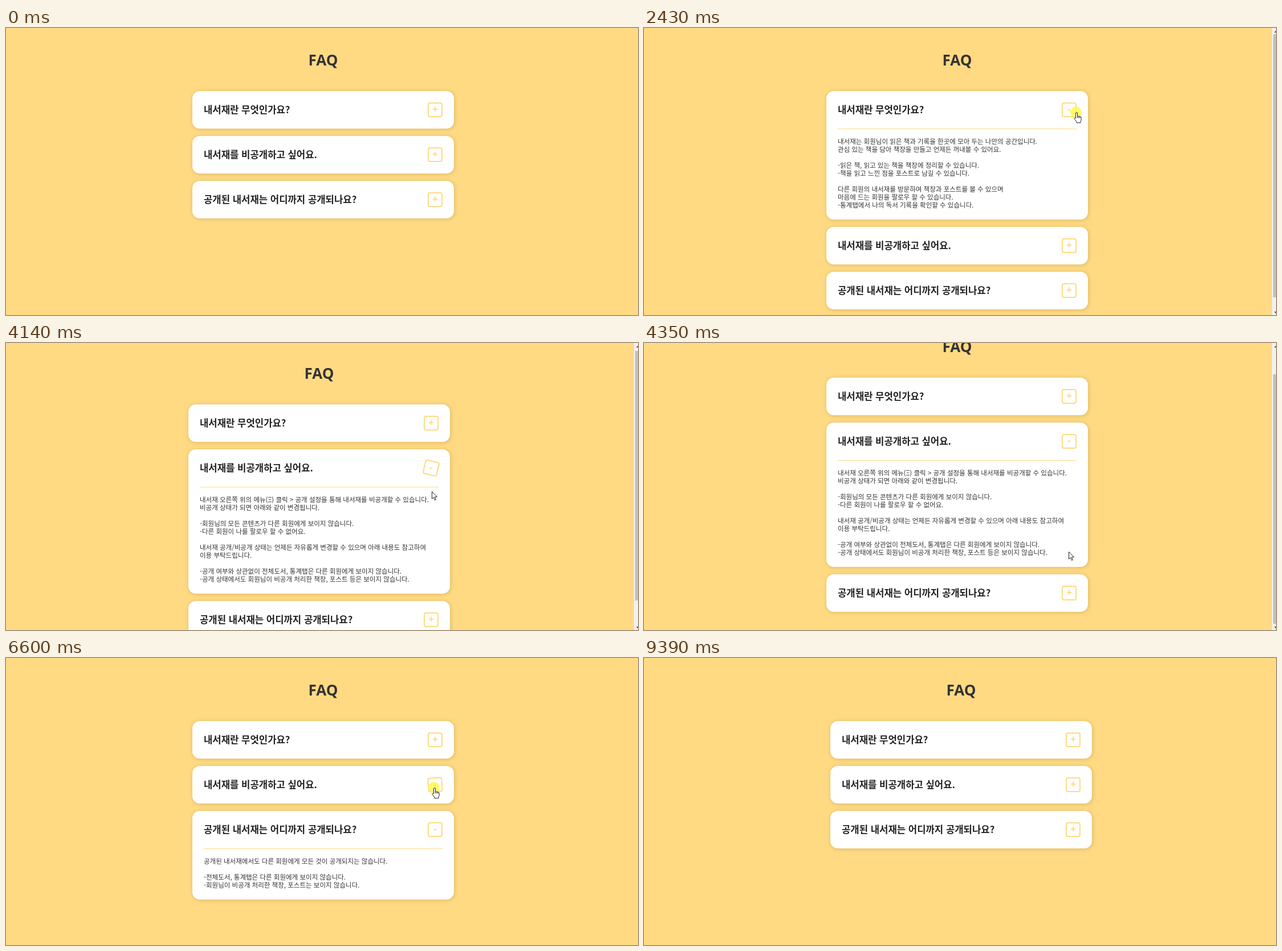
An HTML page that plays this animation: 1109 px wide and 505 px high, repeating every 9.46 s.

```html
<!DOCTYPE html>
<html lang="ko">
<head>
<meta charset="utf-8">
<title>FAQ</title>
<style>
  html, body { margin: 0; width: 100%; height: 100%; overflow: hidden; }
  #stage {
    position: relative; width: 1109px; height: 505px; overflow: hidden;
    background: #ffda83; color: #222;
    font-family: "Noto Sans CJK KR", "Noto Sans CJK", "Noto Sans", sans-serif;
  }
  #page { position: absolute; left: 0; top: 0; width: 1112px; }
  h1 {
    position: absolute; left: 0; top: 36px; width: 1113px; margin: 0;
    font: 700 26px/40px "Noto Sans", sans-serif; text-align: center; color: #333;
  }
  #list { position: absolute; left: 327px; top: 111px; width: 459px; }
  .item {
    margin-bottom: 13px; border-radius: 13px; background: #fff;
    box-shadow: 1px 1px 6px 1px rgba(110, 85, 20, .2);
  }
  .head {
    display: flex; align-items: center; justify-content: space-between;
    height: 66px; padding: 0 20px; white-space: nowrap;
  }
  .question { padding-bottom: 2px; font-size: 16.7px; font-weight: 700; }
  .icon {
    box-sizing: border-box; width: 26px; height: 26px;
    border: 2px solid #ffda83; border-radius: 4px;
    font: 700 17px/20px "Noto Sans", sans-serif; text-align: center; color: #ffda83;
  }
  .answer {
    margin: 0 20px; padding: 14px 0 19px; border-top: 1px solid #ffda83;
    font-size: 11.52px; line-height: 14px; white-space: pre; color: #333;
  }
  #bar { position: absolute; left: 1102px; top: 0; width: 7px; height: 505px; background: #f1f1f1; }
  #thumb { position: absolute; left: 2px; width: 5px; background: #c1c1c1; }
  #bar svg { position: absolute; left: 0; top: 0; }
  #spot {
    position: absolute; left: -10px; top: -10px; width: 20px; height: 20px;
    border-radius: 50%; background: rgba(255, 247, 70, .8);
  }
  #arrow, #hand { position: absolute; left: 0; top: 0; overflow: visible; }
  #arrow path, #hand path { fill: #fff; stroke: #222; stroke-width: 1; stroke-linejoin: round; }
</style>
</head>
<body>
<div id="stage">
  <div id="page"><h1>FAQ</h1><div id="list"></div></div>
  <div id="bar">
    <div id="thumb"></div>
    <svg width="7" height="505"><path d="M4 8L7 4.5V8ZM4 499L7 502.5V499Z" fill="#444"/></svg>
  </div>
  <div id="spot"></div>
  <svg id="arrow" width="10" height="16"><path d="M.5 .5V13.2L3.4 10.5 5.4 15.4 7.4 14.6 5.4 9.8H9.4Z"/></svg>
  <svg id="hand" width="14" height="20">
    <path d="M3.6 11V2a1.5 1.5 0 0 1 3 0V7.2q1.3-.9 2.2.4 1.3-.8 2.2.6 2-.4 2.2 1.2V13q0 1.8-1.2 3.3V18.8H5V16.8L1.2 12.3Q.3 10.6 1.5 10.2 2.6 10 3.6 11Z"/>
    <path d="M6.6 7.2V10.2M8.8 7.6V10.4M11 8.2V10.6"/>
  </svg>
</div>
<script>
const LOOP = 9460, STEP = 5, TURN = 500, VIEW = 505, CLOSED_HEIGHT = 367;
const $ = id => document.getElementById(id);

const faq = [
  ['내서재란 무엇인가요?',
`내서재는 회원님이 읽은 책과 기록을 한곳에 모아 두는 나만의 공간입니다.
관심 있는 책을 담아 책장을 만들고 언제든 꺼내볼 수 있어요.

-읽은 책, 읽고 있는 책을 책장에 정리할 수 있습니다.
-책을 읽고 느낀 점을 포스트로 남길 수 있습니다.

다른 회원의 내서재를 방문하여 책장과 포스트를 볼 수 있으며
마음에 드는 회원을 팔로우 할 수 있습니다.
-통계탭에서 나의 독서 기록을 확인할 수 있습니다.`],
  ['내서재를 비공개하고 싶어요.',
`내서재 오른쪽 위의 메뉴(Ξ) 클릭 > 공개 설정을 통해 내서재를 비공개할 수 있습니다.
비공개 상태가 되면 아래와 같이 변경됩니다.

-회원님의 모든 콘텐츠가 다른 회원에게 보이지 않습니다.
-다른 회원이 나를 팔로우 할 수 없어요.

내서재 공개/비공개 상태는 언제든 자유롭게 변경할 수 있으며 아래 내용도 참고하여
이용 부탁드립니다.

-공개 여부와 상관없이 전체도서, 통계탭은 다른 회원에게 보이지 않습니다.
-공개 상태에서도 회원님이 비공개 처리한 책장, 포스트 등은 보이지 않습니다.`],
  ['공개된 내서재는 어디까지 공개되나요?',
`공개된 내서재에서도 다른 회원에게 모든 것이 공개되지는 않습니다.

-전체도서, 통계탭은 다른 회원에게 보이지 않습니다.
-회원님이 비공개 처리한 책장, 포스트는 보이지 않습니다.`]
];

// Pointer moves: start, end, target x and y, slow-down power
const enter = { t: 195, x: 1060, y: 500 };
const moves = [
  [195, 1180, 758, 148, 1.5],
  [2775, 3100, 753, 230],
  [3725, 4140, 747, 260],
  [4140, 4480, 744, 433],
  [5690, 6210, 751, 228],
  [7400, 7600, 748, 219],
  [8340, 8940, 1075, 506]
];
const clicks = [1580, 2495, 3475, 4950, 6665, 7945];

const items = faq.map(([question, text]) => {
  const add = (parent, name, content = '') => {
    const el = parent.appendChild(document.createElement('div'));
    el.className = name;
    el.textContent = content;
    return el;
  };
  const box = add($('list'), 'item');
  const head = add(box, 'head');
  add(head, 'question', question);
  return {
    icon: add(head, 'icon', '+'),
    answer: add(box, 'answer', text),
    extra: 34 + 14 * text.split('\n').length,
    hovers: []
  };
});

const clamp = v => Math.max(0, Math.min(1, v));

function tip(t) {
  if (t < enter.t || t > moves[moves.length - 1][1]) return null;
  let { x, y } = enter;
  for (const [from, to, tx, ty, power = 1] of moves) {
    const k = 1 - (1 - clamp((t - from) / (to - from))) ** power;
    x += (tx - x) * k;
    y += (ty - y) * k;
  }
  return [Math.round(x), Math.round(y)];
}

function layout(open, t) {
  const height = CLOSED_HEIGHT + (open < 0 ? 0 : items[open].extra);
  const scrolls = height > VIEW;
  const p = clamp((t - 4112) / 160);
  const slide = p < .5 ? 2 * p * p : 1 - 2 * (1 - p) ** 2;
  const scroll = scrolls && t < 4950 ? Math.round(slide * (height - VIEW)) : 0;
  return { height, scrolls, scroll, shift: scrolls ? 7 : 0 };
}

function iconAt(at, open, t) {
  if (!at) return -1;
  const { scroll, shift } = layout(open, t);
  return items.findIndex((item, i) => {
    const left = 740 - shift;
    const top = 131 + 79 * i - scroll + (open >= 0 && open < i ? items[open].extra : 0);
    return at[0] >= left && at[0] < left + 26 && at[1] >= top && at[1] < top + 26;
  });
}

// Play the pointer through once to learn what it hovers and opens.
const states = [];
for (let t = 0, open = -1, over = -1; t < LOOP; t += STEP) {
  if (clicks.includes(t)) open = open === over ? -1 : over;
  const now = iconAt(tip(t), open, t);
  if (now !== over) {
    if (over >= 0) items[over].hovers.at(-1)[1] = t;
    if (now >= 0) items[now].hovers.push([t, LOOP]);
    over = now;
  }
  states.push({ open, over });
}

// CSS "ease": cubic-bezier(.25, .1, .25, 1)
function ease(x) {
  if (x <= 0 || x >= 1) return clamp(x);
  let lo = 0, hi = 1, u;
  const bez = (a, b) => 3 * a * u * (1 - u) ** 2 + 3 * b * u * u * (1 - u) + u ** 3;
  for (let i = 0; i < 20; i++) {
    u = (lo + hi) / 2;
    if (bez(.25, .25) < x) lo = u; else hi = u;
  }
  return bez(.1, 1);
}

function angle(hovers, t) {
  const last = hovers.filter(h => h[0] <= t).pop();
  if (!last) return 0;
  const [from, to] = last;
  const turned = ease((Math.min(t, to) - from) / TURN);
  return 180 * (t < to ? turned : turned * (1 - ease((t - to) / (TURN * turned))));
}

const show = (el, on) => { el.style.display = on ? 'block' : 'none'; };
const move = (el, x, y) => { el.style.transform = `translate(${x}px, ${y}px)`; };

function render(t) {
  const { open, over } = states[Math.floor(t / STEP)];
  items.forEach(({ icon, answer, hovers }, i) => {
    const sign = i === open ? '-' : '+';
    if (icon.textContent !== sign) icon.textContent = sign;
    icon.style.transform = `rotate(${angle(hovers, t)}deg)`;
    show(answer, i === open);
  });

  const { height, scrolls, scroll, shift } = layout(open, t);
  const ratio = 483 / height;
  move($('page'), -shift, -scroll);
  show($('bar'), scrolls);
  $('thumb').style.top = 11 + scroll * ratio + 'px';
  $('thumb').style.height = VIEW * ratio + 'px';

  const at = tip(t);
  show($('hand'), at && over >= 0);
  show($('arrow'), at && over < 0);
  show($('spot'), clicks.some(c => t >= c - 85 && t < c));
  if (at) {
    const [x, y] = at;
    move($('hand'), x - 4, y);
    move($('arrow'), x, y);
    move($('spot'), x, y);
  }
}

const start = performance.now();
function tick() {
  render((performance.now() - start) % LOOP);
  requestAnimationFrame(tick);
}
tick();
</script>
</body>
</html>
```
